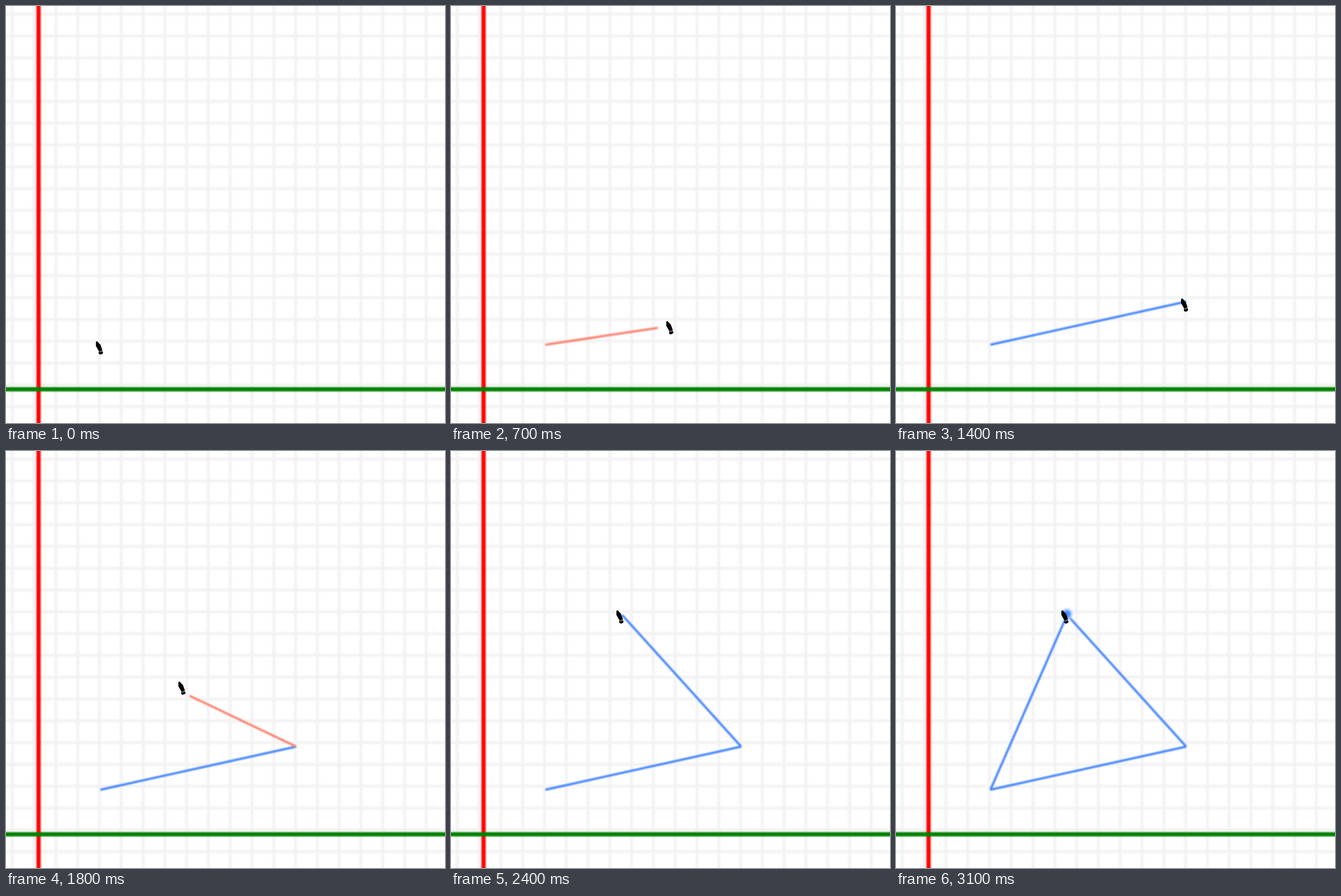
These frames come from a looping animation (767 px wide and 730 px high, 3770 ms). An HTML page:

```html
<!DOCTYPE html>
<html lang="en">
<head>
<meta charset="utf-8">
<title>Drawing a triangle</title>
<style>
html, body { margin: 0; width: 100%; height: 100%; overflow: hidden; background: #fff; }
svg { display: block; width: 767px; height: 730px; }
path { fill: none; }
#grid { stroke: #f2f2f2; stroke-width: 5; filter: blur(1.5px); }
#axes { stroke-width: 7.4; filter: blur(1px); }
#sides { stroke-width: 4; opacity: .88; filter: blur(.9px); }
#pencil { filter: blur(.4px); }
</style>
</head>
<body>
<svg viewBox="0 0 767 730">
  <defs>
    <radialGradient id="glow">
      <stop offset="0" stop-color="#3c86ff"/>
      <stop offset=".4" stop-color="#5c9aff"/>
      <stop offset=".65" stop-color="#a9caff" stop-opacity=".75"/>
      <stop offset="1" stop-color="#d5e5ff" stop-opacity="0"/>
    </radialGradient>
  </defs>
  <g id="grid"></g>
  <g id="axes">
    <path d="M56.9 -20V750" stroke="#f00"/>
    <path d="M-20 671H787" stroke="#008000"/>
  </g>
  <g id="sides"></g>
  <circle id="dot" cx="298.5" cy="285.5" r="13" fill="url(#glow)"/>
  <g id="pencil">
    <path d="M0 1 L2 -.3 L8 6 L11.5 15.8 L5.8 18.2 L0 8Z" style="fill:#000"/>
    <ellipse cx="8.6" cy="19.8" rx="3.8" ry="3" transform="rotate(-18 8.6 19.8)"/>
    <path d="M6 18.6 L11.6 16.6" stroke="#ddd" stroke-width=".9"/>
  </g>
</svg>
<script>
const LOOP = 3770, STEP = 100, LAG = 0.62;
const RED = '#ff7360', BLUE = '#2f78ff';
const A = [165, 593], B = [507, 517.5], C = [299, 287];

// Pointer strokes: curved, slowing down, timed in steps
const moves = [
  { start: 4, end: 11, bend: [327, 588], to: [491, 520] },
  { start: 11, end: 13, bend: [500, 519], to: [506, 518] },
  { start: 15, end: 22, bend: [274, 512], to: [297, 285] },
  { start: 25, end: 28, bend: [240, 430], to: [169, 583] },
  { start: 29, end: 31, bend: [465, 400], to: [297, 285] }
];

// A side follows the pointer from step "from" until it is fixed
const sides = [
  { a: A, b: B, from: 5, fixed: 13 },
  { a: B, b: C, from: 16, fixed: 23 },
  { a: C, b: A, from: 26, fixed: 29 }
];

const el = id => document.getElementById(id);
const show = (node, on) => node.setAttribute('visibility', on ? 'visible' : 'hidden');
const mix = (p, q, s) => p.map((v, i) => v + (q[i] - v) * s);
const easeOut = u => 1 - (1 - u) ** 2;

function addPath(parent, d) {
  const path = document.createElementNS('http://www.w3.org/2000/svg', 'path');
  path.setAttribute('d', d);
  return parent.appendChild(path);
}

let mesh = '';
for (let i = 0; i < 20; i++) {
  mesh += `M${11 + 38.07 * i} -20V750M-20 ${14.3 + 38.17 * i}H787`;
}
addPath(el('grid'), mesh);
for (const side of sides) side.path = addPath(el('sides'), 'M0 0');

function pointerAt(step) {
  let point = A;
  for (const { start, end, bend, to } of moves) {
    if (step <= start) break;
    const s = easeOut(Math.min((step - start) / (end - start), 1));
    point = mix(mix(point, bend, s), mix(bend, to, s), s);
  }
  return point;
}

function draw(time) {
  const step = Math.floor((time % LOOP) / STEP);
  const [x, y] = pointerAt(step);
  const trail = mix(pointerAt(step - 1), [x, y], LAG);
  for (const { a, b, from, fixed, path } of sides) {
    const done = step >= fixed;
    path.setAttribute('d', `M${a}L${done ? b : trail}`);
    path.setAttribute('stroke', done ? BLUE : RED);
    show(path, step >= from);
  }
  el('pencil').setAttribute('transform', `translate(${x - 8} ${y - 6})`);
  show(el('dot'), step >= 31);
}

const begin = performance.now();
function tick() {
  draw(performance.now() - begin);
  requestAnimationFrame(tick);
}
tick();
</script>
</body>
</html>
```
